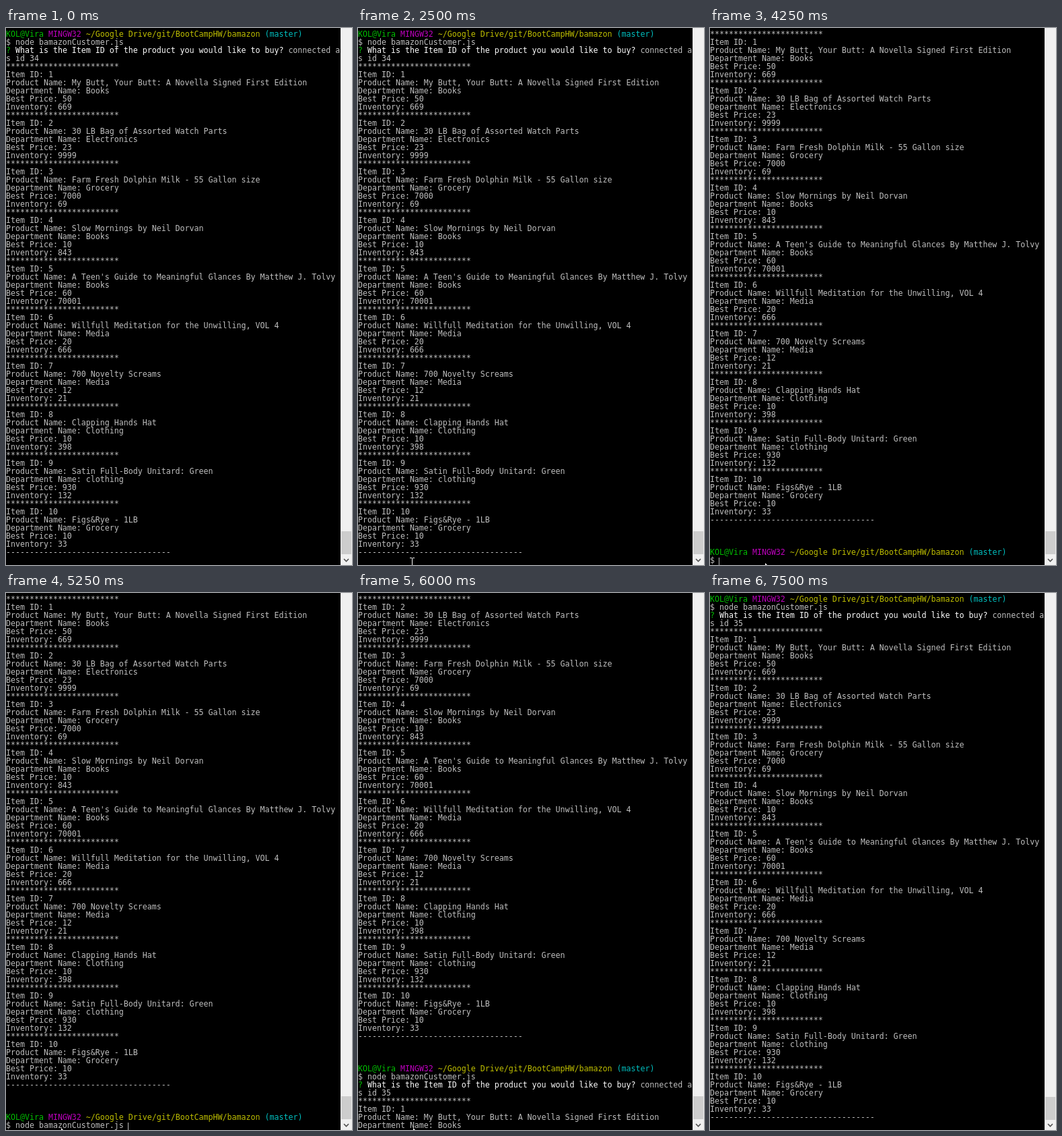
An HTML page that plays this animation: 514x796 px, repeating every 8000 ms.

```html
<!DOCTYPE html>
<html lang="en">
<head>
<meta charset="utf-8">
<title>Terminal store</title>
<style>
  html, body { margin: 0; width: 514px; height: 796px; overflow: hidden; background: #000; }
  #stage { position: relative; width: 514px; height: 796px; overflow: hidden; }
  pre { position: absolute; left: 0; top: 3px; margin: 0; color: #bfbfbf;
        font: 11.627px/12px "DejaVu Sans Mono", monospace; font-variant-ligatures: none; }
  .g { color: #00bf00 } .m { color: #bf00bf } .y { color: #bfbf00 } .c { color: #00bfbf } .w { color: #fff }
  svg { position: absolute; left: 0; top: 0; }
</style>
</head>
<body>
<div id="stage">
  <pre id="text"></pre>
  <svg width="514" height="796">
    <rect id="caret" y="785" width="1" height="11" fill="#bfbfbf"/>
    <path id="beam" d="M0 .5h3M4 .5h3M3.5 1v18" fill="none" stroke="#fff"/>
    <path id="arrow" d="M82 793v3h3z" fill="#fff"/>
    <rect x="497" width="17" height="796" fill="#f0f0f0"/>
    <rect id="thumb" x="498" width="15" height="34" fill="#cdcdcd"/>
    <path d="M502 787l3.5 3.5 3.5-3.5" fill="none" stroke="#505050" stroke-width="1.6"/>
  </svg>
</div>
<script>
const $ = id => document.getElementById(id);
const span = (cls, s) => `<span class="${cls}">${s}</span>`;

const products = `My Butt, Your Butt: A Novella Signed First Edition|Books|50|669
30 LB Bag of Assorted Watch Parts|Electronics|23|9999
Farm Fresh Dolphin Milk - 55 Gallon size|Grocery|7000|69
Slow Mornings by Neil Dorvan|Books|10|843
A Teen's Guide to Meaningful Glances By Matthew J. Tolvy|Books|60|70001
Willfull Meditation for the Unwilling, VOL 4|Media|20|666
700 Novelty Screams|Media|12|21
Clapping Hands Hat|Clothing|10|398
Satin Full-Body Unitard: Green|clothing|930|132
Figs&amp;Rye - 1LB|Grocery|10|33`.split('\n').map(row => row.split('|'));

const session = id => [
  [span('g', 'KOL@Vira'), span('m', 'MINGW32'),
   span('y', '~/Google Drive/git/BootCampHW/bamazon'), span('c', '(master)')].join(' '),
  '$ node bamazonCustomer.js',
  span('g', '?') + span('w', ' What is the Item ID of the product you would like to buy?') + ' connected a',
  's id ' + id,
  ...products.flatMap(([name, dept, price, stock], i) => [
    '*'.repeat(24), 'Item ID: ' + (i + 1), 'Product Name: ' + name,
    'Department Name: ' + dept, 'Best Price: ' + price, 'Inventory: ' + stock]),
  '-'.repeat(35)
];
const lines = [...session(34), '', '', '', ...session(35)];
const COMMAND = 69;  // line where the second command is entered

// start time, lines scrolled off, lines printed
const screens = [[0, 0, 65], [3250, 2, 65], [4250, 4, 70], [5750, 5, 70], [6000, 10, 76], [6250, 68, 133]];
// start time, left, top of the text pointer
const beams = [[0], [750, 96, 790], [1000, 78, 785], [1250, 76, 785], [2000, 75, 785],
               [2500, 77, 785], [3250], [3500, 78, 784], [4000]];

const at = (steps, t) => steps.findLast(step => step[0] <= t);
const show = (el, on) => el.setAttribute('visibility', on ? 'visible' : 'hidden');
let last;

function draw(now) {
  const t = now % 8000;
  const [, scroll, count] = at(screens, t);
  const typed = t >= 5250;
  const key = scroll + ' ' + typed;
  if (key !== last) {
    last = key;
    $('text').innerHTML = lines.slice(scroll, count)
      .map((s, i) => i + scroll === COMMAND && !typed ? '$' : s).join('\n');
  }
  const [, x, y] = at(beams, t);
  show($('beam'), x);
  if (x) $('beam').setAttribute('transform', `translate(${x} ${y})`);
  show($('arrow'), t >= 4250 && t < 7500);
  show($('caret'), t >= 4250 && t < 4750 || typed && t < 5750);
  $('caret').setAttribute('x', typed ? 181 : 13);
  $('thumb').setAttribute('y', t < 6250 ? 746 : 747);
  requestAnimationFrame(draw);
}
requestAnimationFrame(draw);
</script>
</body>
</html>
```
